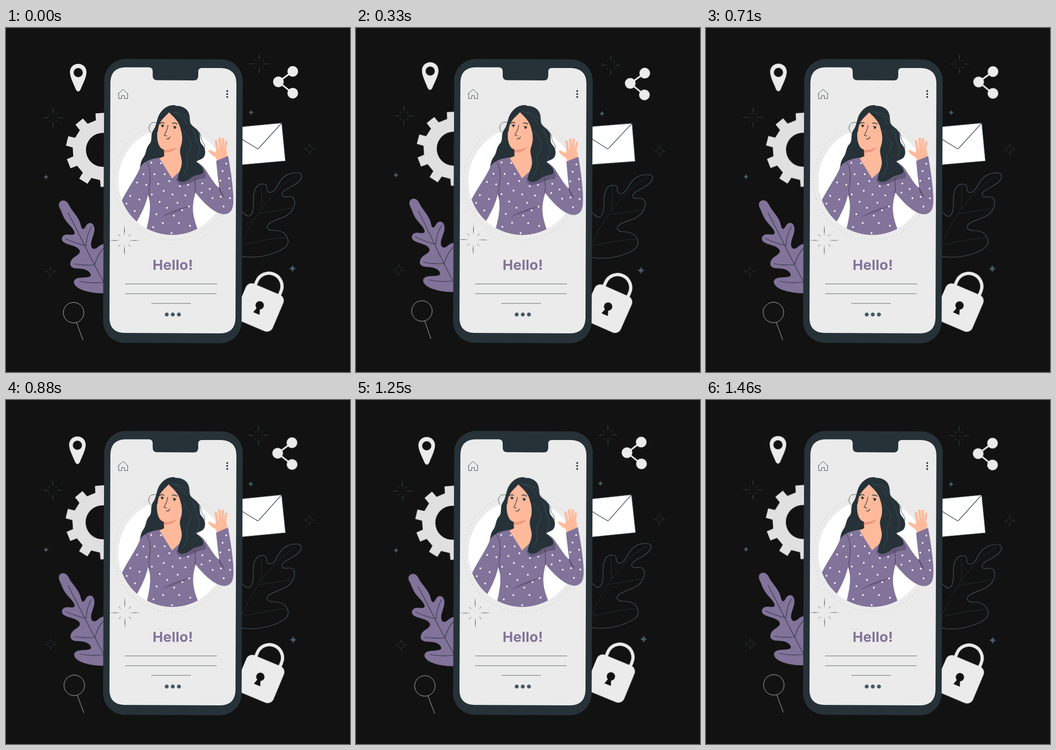
An HTML page that plays this animation: 748x748 px, repeating every 1500 ms.

```html
<!DOCTYPE html>
<html lang="en">
<head>
<meta charset="utf-8">
<title>Hello</title>
<style>
  html, body { margin: 0; height: 100%; overflow: hidden; background: #121212; }
  svg { display: block; width: 100vw; height: 100vh; }
  .line { fill: none; stroke: #263238; stroke-width: 1.2; stroke-linecap: round; stroke-linejoin: round; }
  .slate { stroke: #455a64; }
  .thin { stroke-width: .9; }
  .purple { fill: #82739a; }
  .dark { fill: #263238; }
  .light { fill: #ebebeb; }
  .skin { fill: #ffba9c; }
  .fold { fill: #655a7b; }
  .hello { font: 700 30.5px Inter, "Open Sans", sans-serif; letter-spacing: .3px; text-anchor: middle; }
</style>
</head>
<body>
<svg viewBox="0 0 748 748">
  <defs>
    <clipPath id="frame">
      <circle cx="361.3" cy="333" r="117"/>
      <rect x="200" y="100" width="400" height="215"/>
      <rect x="425" y="300" width="120" height="130"/>
    </clipPath>
  </defs>

  <g data-pivot="379.5 446">
    <path class="purple" d="M124 375C115 376 113 384 117 392C121 400 123 407 127 414C133 425 146 434 149 444C151 452 141 449 132 449C121 450 118 461 126 466C135 472 147 472 155 478C165 485 160 491 152 496C143 501 139 508 140 515C143 525 156 522 167 524C178 526 186 533 184 539C180 544 163 541 153 545C145 549 146 557 155 564C169 573 190 577 214 577H240V466C218 466 206 470 199 477C190 484 184 479 185 468C187 455 194 445 192 434C190 422 179 421 174 430C169 440 165 439 163 430C160 414 148 403 139 389C135 380 131 375 124 375Z"/>
    <path class="line" d="M135 402Q160 450 181 493L212 552M129 458Q150 468 172 473M186 432Q175 450 174 474M148 513Q170 517 192 515M211 480Q199 494 193 514M160 551Q186 556 212 553"/>
    <path class="line slate" d="M500 494C523 500 552 500 578 491C600 484 617 474 613 460C609 443 594 440 582 440C571 440 564 435 570 427C578 418 596 417 611 407C627 397 632 378 624 369C616 362 606 372 601 364C597 355 613 350 627 341C641 333 646 322 641 317C635 313 614 314 603 325C591 336 588 353 577 357C569 359 566 352 567 346C567 338 554 337 547 343C537 353 538 370 538 381C538 398 534 410 526 409C519 408 518 399 508 400"/>
    <path class="line thin" d="M632 321C596 340 570 373 550 401C532 427 520 450 511 475M555 344Q557 366 555 394M625 391Q580 399 549 403M607 456Q565 459 516 471"/>
  </g>

  <g data-pivot="379.5 378.5">
    <path id="gear" fill="#e0e0e0" fill-rule="evenodd"/>
    <path class="light" fill-rule="evenodd" d="M157 78C146 78 139 86 139 96C139 107 147 121 152 134Q157 142 162 134C167 121 175 107 175 96C175 86 168 78 157 78ZM157 87A10 10 0 1 1 157 107A10 10 0 1 1 157 87Z"/>
    <path d="M623 94.500L592.500 117L623.500 142" fill="none" stroke="#ebebeb" stroke-width="3.500"/>
    <g class="light">
      <circle cx="623.500" cy="94.300" r="11.500"/>
      <circle cx="592.300" cy="117" r="11.500"/>
      <circle cx="623.500" cy="141.700" r="11.500"/>
    </g>
    <g transform="translate(551 604) rotate(23)">
      <path d="M-26 -34V-47A28.500 28.500 0 0 1 31 -47V-34" fill="none" stroke="#ebebeb" stroke-width="7"/>
      <rect class="light" x="-43" y="-39.500" width="88.500" height="86" rx="14"/>
      <path fill="#121212" d="M-3.500 7L-7 18H8L4 7A9 9 0 1 0 -3.500 7Z"/>
    </g>
    <g fill="none" stroke="#dcdcdc" stroke-width=".9">
      <circle cx="147" cy="619" r="22.300"/>
      <path d="M153.500 641L167.500 679"/>
    </g>
  </g>

  <g data-pivot="548 252">
    <path fill="#fff" stroke="#455a64" d="M488 217L599.500 206.500L607.500 289L495 299Z"/>
    <path class="line" d="M488 217Q507 238 518 245L546 262Q548 264 550 261L599.500 206.500"/>
  </g>
  <g id="outer" data-pivot="360 308"></g>

  <rect class="dark" x="212.300" y="67.700" width="301.300" height="617.300" rx="47" transform="rotate(.27 363 376)"/>
  <path class="light" d="M260 85.500H311Q319 86 319 94V104Q319 113.500 329 113.500L408 114Q418 114 418 104V95Q418 87 426 87L467 87Q501 88 501 121L499 631Q498 664 465 664L257 663Q225 662 225 630L227 118Q228 86 260 85.500Z"/>
  <path class="line thin" d="M243.500 143.500L254.500 133.500L265.500 143.500M245 142.500V153.500H251.500V147H257.500V153.500H264.500V142.500"/>
  <g class="dark">
    <circle cx="481" cy="137" r="2"/><circle cx="481" cy="143.500" r="2"/><circle cx="481" cy="150" r="2"/>
  </g>
  <path d="M259 556.500H459M259 577.800H458M316 598.800H402" stroke="#263238" stroke-width=".75"/>
  <g fill="#455a64">
    <circle cx="349.500" cy="623" r="4.300"/><circle cx="362.700" cy="623" r="4.300"/><circle cx="376" cy="623" r="4.300"/>
  </g>
  <text class="hello purple" x="362.800" y="525.500">Hello!</text>
  <circle cx="361.300" cy="333" r="127.500" fill="none" stroke="#dedede" stroke-width="3.400" stroke-linecap="round" stroke-dasharray="0 8.011"/>
  <circle cx="361.300" cy="333" r="117" fill="#fff"/>

  <g clip-path="url(#frame)">
    <g data-pivot="370 322">
      <path class="dark" d="M368 168C350 166 337 179 331 193C327 204 327 212 321 221C313 232 319 243 313 251C303 261 306 272 299 281C293 289 293 296 291 304C306 294 322 286 348 281L362 240L390 200Z"/>
      <path class="line thin" d="M328 206C318 203 311 209 311 217C311 224 315 228 320 231M420 226C426 236 423 242 428 248C433 255 435 264 428 266"/>
      <g class="skin">
        <path d="M343 255L344 279L331 284L361 328L390 304L384 240Z"/>
        <path d="M459 289L456 281C449 278 443 272 440 268Q439 264 445 266L455 271L458 263L478 263C482 268 481 274 481 284Z"/>
      </g>
      <path d="M460 265L456.500 246M466 263L464.500 241M471 263L472 241.500M476 265L479 248" stroke="#ffba9c" stroke-width="5.300" stroke-linecap="round"/>

      <path class="purple" d="M333 282C313 285 300 290 292 302C284 324 264 349 249 381L240 410L280 428C295 404 304 384 309 362C315 382 315 400 305 440L303 470H425L417 438C404 405 404 386 412 358C423 372 438 388 452 397C465 405 475 407 483 403C495 397 495 382 494 360C492 332 488 305 483 278L457 289C459 310 461 330 464 349C452 338 442 320 433 307C425 295 415 291 405 287L361 327Z"/>
      <path class="fold" d="M338 412C358 402 380 399 398 387C382 391 353 399 338 412ZM309 362L314 357Q311 371 315 389Q313 374 309 362ZM464 348L475 368Q465 361 462 344ZM370 328Q374 343 386 341C402 338 415 327 432 327Q436 323 433 313L410 304Z"/>
      <path class="line thin" d="M304 291C316 303 315 325 310 358M410 326Q413 341 411 358M463 346Q467 359 474 367"/>
      <g id="dots" fill="#fff"></g>

      <path d="M344 262Q357 266 371 259Q365 271 344 271Z" fill="#ee967b"/>
      <path class="skin" d="M355 179C342 184 333 198 330 214C328 230 328 244 332 253C336 264 344 266 353 265C365 263 377 257 384 244L388 210Z"/>
      <path class="line" d="M334.500 208Q339 204 344 207M362 207Q367 205 372 209" style="stroke-width:1.700"/>
      <path class="line" d="M352 211C352 220 347 228 344 233Q347 235 350 234.500M348.500 241Q354 243 356.500 236.500"/>
      <path class="dark" d="M350 241.500Q353 243.500 356.500 237Q355 244 350 241.500Z"/>
      <g class="dark"><ellipse cx="340.500" cy="213" rx="2.300" ry="2.800"/><ellipse cx="367" cy="216.500" rx="2.300" ry="2.800"/></g>
      <path class="line thin" d="M336.500 211.500Q340 209 344 212M362.500 214Q367 212 371 215.500"/>
      <path d="M365 223h.1M369 226h.1M373 222h.1M376 226h.1" stroke="#ee8f72" stroke-width="1.300" stroke-linecap="round"/>

      <path class="dark" d="M358 179C350 190 338 197 333 210Q331 216 330 226L325 228L328 205L345 175L368 169Z"/>
      <path class="dark" d="M350 179C358 166 383 166 394 179C401 188 399 198 401 207C405 215 418 219 421 230C423 239 420 245 425 252C432 259 435 268 432 277C430 284 422 286 414 290C419 297 433 304 429 314C423 321 411 318 401 327C391 335 380 337 375 331C370 325 380 310 382 297C384 282 375 273 380 258C385 245 383 230 380 221C376 202 365 194 350 179Z"/>
      <path class="line slate" style="stroke-width:.8" d="M368 183C383 184 398 191 400 205M360 181C376 187 389 195 393 209M387 223C393 239 405 244 402 258C399 272 389 276 394 291C397 302 389 312 386 321M404 219C415 231 411 245 419 257C426 269 414 277 418 287"/>
    </g>
  </g>
  <g id="inner" data-pivot="360 308"></g>
</svg>
<script>
const $ = id => document.getElementById(id);

const polar = (r, deg) => {
  const a = deg * Math.PI / 180;
  return `${(r * Math.cos(a)).toFixed(2)} ${(r * Math.sin(a)).toFixed(2)}`;
};

// Thin needle between two radii, widest in the middle
const needle = (from, to, deg, w) => {
  const mid = (from + to) / 2;
  const d = w / mid * 57.3;
  return `M${polar(from, deg)}L${polar(mid, deg - d)}L${polar(to, deg)}L${polar(mid, deg + d)}Z`;
};

const burst = (x, y, r, fill) => {
  let d = '';
  for (let a = 0; a < 360; a += 45) {
    d += a % 90 ? needle(r * .32, r * .6, a, .45) : needle(r * .27, r, a, .6);
  }
  return `<path transform="translate(${x} ${y})" fill="${fill}" d="${d}"/>`;
};

const star = (x, y, r) =>
  `<path transform="translate(${x} ${y}) scale(${r})" fill="#455a64"
    d="M0-1Q.2-.2 1 0Q.2.2 0 1Q-.2.2-1 0Q-.2-.2 0-1Z"/>`;

$('outer').innerHTML =
  burst(102.5, 195, 24, '#455a64') + burst(550.5, 78, 24, '#455a64') +
  burst(660, 263, 13.5, '#455a64') + burst(96, 530, 13.5, '#455a64') +
  star(533, 183.5, 6) + star(87, 324, 6) + star(623, 523, 8);
$('inner').innerHTML = burst(257.5, 462, 34, '#263238');

const teeth = [];
for (let i = 0; i < 10; i++) {
  const a = 266 + i * 36;
  teeth.push(polar(66, a - 9.5), polar(81, a - 7.5), polar(81, a + 7.5), polar(66, a + 9.5));
}
$('gear').setAttribute('d', `M${teeth.join('L')}ZM-37 0A37 37 0 1 0 37 0A37 37 0 1 0 -37 0Z`);
$('gear').setAttribute('transform', 'translate(210.8 265)');

const spots = [
  316,293, 337,294, 299,318, 323,318, 345,318, 285,336, 305,341, 331,339, 355,333,
  378,344, 396,341, 270,365, 290,373, 317,362, 343,354, 362,362, 373,380, 390,364,
  334,378, 350,391, 383,396, 327,405, 365,408, 398,388, 320,433, 341,424, 376,424,
  400,430, 360,446, 262,382, 280,398, 427,338, 425,358, 443,350, 449,370, 467,367,
  486,349, 487,370, 473,388, 471,311, 485,327, 466,332, 479,295
];
for (let i = 0; i < spots.length; i += 2) {
  $('dots').innerHTML += `<circle cx="${spots[i]}" cy="${spots[i + 1]}" r="1.900"/>`;
}

const sway = [
  { transform: 'rotate(0deg)', offset: 0 },
  { transform: 'rotate(1deg)', offset: .25 },
  { transform: 'rotate(-1deg)', offset: .75 },
  { transform: 'rotate(0deg)', offset: 1 }
];
for (const g of document.querySelectorAll('[data-pivot]')) {
  const [x, y] = g.dataset.pivot.split(' ');
  g.style.transformOrigin = `${x}px ${y}px`;
  g.animate(sway, { duration: 1500, iterations: Infinity });
}
</script>
</body>
</html>
```
